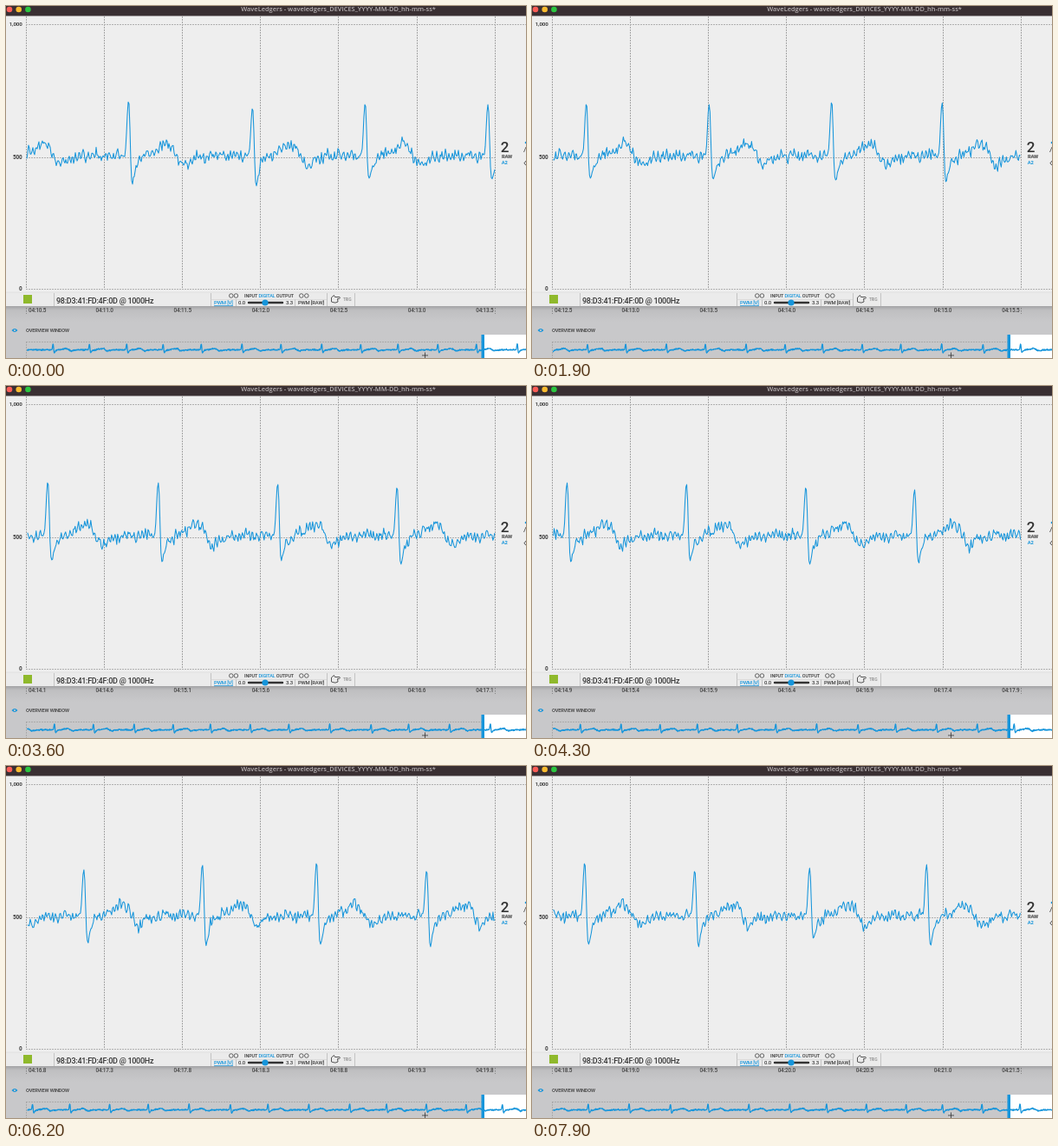
An HTML page with a canvas that plays this animation: 600x407 px, repeating every 8 s.

```html
<!DOCTYPE html>
<html lang="en">
<head>
<meta charset="utf-8">
<title>Signal recorder</title>
<style>
html, body { margin: 0; width: 100%; height: 100%; overflow: hidden; background: #c8c8ca; }
canvas { display: block; width: 600px; height: 407px; }
</style>
</head>
<body>
<canvas id="stage" width="600" height="407"></canvas>
<script>
const ctx = document.getElementById('stage').getContext('2d');
const BLUE = '#1695db', INK = '#3c3c3c', PANEL = '#c8c8ca', PAPER = '#eeeeee';
const LEFT = 23.5, STEP = 90.1, CHUNK = 27.05, LOOP = 8000;
const BASE = 173;
const NARROW = 'Roboto, "Liberation Sans", sans-serif';

// Beat position along the recording, peak height, trough depth
const beats = [
  [-1466, 114, 205], [-1340, 116, 203], [-1211, 113, 206], [-1085, 118, 204],
  [-953, 115, 205], [-812, 112, 203], [-677, 116, 206], [-536, 114, 204],
  [-401, 118, 206], [-272, 113, 205], [-134, 116, 203], [-0.5, 114, 205],
  [141, 111, 206], [284, 119, 208], [414, 114, 199], [555.7, 114, 201],
  [697, 112, 201], [824.5, 112, 205], [962.3, 114, 203], [1100, 118, 206],
  [1225.5, 120, 204], [1362.3, 115, 209], [1494, 113, 206], [1621, 122, 209],
  [1753.6, 118, 201], [1888.6, 114, 208]
];

// Slow wave that follows each spike
const tail = [[9, 11], [12, 6], [18, 1], [28, -4], [36, -9], [45, -14],
  [51, -10], [56, 3], [62, 12], [72, 5], [84, 1], [94, 0]];

function interp(points, x) {
  if (x <= points[0][0]) return points[0][1];
  for (let i = 1; i < points.length; i++) {
    const [x0, y0] = points[i - 1], [x1, y1] = points[i];
    if (x <= x1) return y0 + (y1 - y0) * (x - x0) / (x1 - x0);
  }
  return points[points.length - 1][1];
}

function rand(i) {
  const v = Math.sin(i * 127.1 + 11.7) * 43758.5453;
  return v - Math.floor(v);
}

function noise(i) {
  const ripple = Math.sin(i * 1.45 + 2 * Math.sin(i * 0.17)) * (1.5 + 4.5 * rand(i));
  const drift = 2 * Math.sin(i * 0.37 + 2 * Math.sin(i * 0.05));
  return ripple + drift + (rand(i + 5000) - 0.5) * 6;
}

function level(i) {
  const n = beats.findIndex(b => b[0] - 7 > i);
  const beat = beats[n < 0 ? beats.length - 1 : n - 1];
  if (!beat) return BASE + noise(i);
  const [pos, top, low] = beat, d = i - pos - 0.4;
  if (d > 9) return BASE + interp(tail, d) + noise(i);
  const up = top - BASE, down = low - BASE;
  const spike = [[-7, 0], [-4, -2], [-3, up * 0.2], [-1.3, up * 0.8], [-0.5, up],
    [0.5, up], [1.3, up * 0.7], [2.5, 4], [3.4, down * 0.85], [4.6, down],
    [6.3, down * 0.75], [9, 11]];
  return BASE + interp(spike, d) + noise(i) * (d < -4 || d > 5 ? 0.4 : 0);
}

const FIRST = -1700, samples = [];
for (let i = FIRST; i < 2100; i++) samples.push(level(i));
const sample = i => samples[i - FIRST];

function text(str, x, y, size, color = INK, align = 'left', weight = 500, family = NARROW) {
  ctx.font = `${weight} ${size}px ${family}`;
  ctx.letterSpacing = family === NARROW ? `${-0.03 * size}px` : '0px';
  ctx.fillStyle = color;
  ctx.textAlign = align;
  ctx.fillText(str, x, y);
}

function rect(x, y, w, h, color) {
  ctx.fillStyle = color;
  ctx.fillRect(x, y, w, h);
}

function line(x0, y0, x1, y1, color, width = 1, dash = []) {
  ctx.strokeStyle = color;
  ctx.lineWidth = width;
  ctx.setLineDash(dash);
  ctx.beginPath();
  ctx.moveTo(x0, y0);
  ctx.lineTo(x1, y1);
  ctx.stroke();
  ctx.setLineDash([]);
}

function disc(x, y, r, color, hollow) {
  ctx.beginPath();
  ctx.arc(x, y, r, 0, Math.PI * 2);
  ctx.lineWidth = 0.8;
  ctx[hollow ? 'strokeStyle' : 'fillStyle'] = color;
  hollow ? ctx.stroke() : ctx.fill();
}

function shape(d, color, width) {
  const p = new Path2D(d);
  ctx.strokeStyle = ctx.fillStyle = color;
  ctx.lineWidth = width || 1;
  width ? ctx.stroke(p) : ctx.fill(p);
}

function titleBar() {
  rect(0, 0, 600, 11.5, '#392f32');
  ['#fb5d57', '#fbbc30', '#2bc640'].forEach((c, i) => disc(4 + i * 10.7, 4, 3.3, c));
  text('WaveLedgers - waveledgers_DEVICES_YYYY-MM-DD_hh-mm-ss*', 383.5, 3.8, 7.45,
    '#b8b2b4', 'center', 600, '"Open Sans", sans-serif');
}

function plotArea() {
  rect(0, 11, 600, 320, PAPER);
  for (let i = 0; i < 7; i++) {
    const x = Math.floor(LEFT + i * STEP) + 0.5;
    line(x, 12, x, 328, '#a6a6a6', 1, [2, 1]);
  }
  [21.5, 175.5, 327.5].forEach(y => line(23, y, 600, y, '#b0b0b0', 1, [2, 1]));
  rect(565, 150, 35, 40, PAPER);
  text('1,000', 18.5, 21.5, 6.2, INK, 'right', 700);
  text('500', 18.5, 175, 6.4, INK, 'right', 700);
  text('0', 18.5, 327.5, 6.4, INK, 'right', 700);
  text('2', 575.3, 163.5, 17, '#333', 'center');
  text('RAW', 578, 174, 5.8, INK, 'center', 700);
  text('A2', 575.2, 181, 5.8, BLUE, 'center', 700);
  disc(600, 158, 1.3, BLUE);
  shape('M600 163 L597.5 169', '#555', 0.9);
  shape('M600 179 L597.8 182 L600 184', '#555', 1);
}

function toolbar() {
  rect(0, 331, 600, 16, '#ebebeb');
  line(0, 331, 600, 331, '#dedede', 0.8);
  rect(20, 334, 10, 10, '#8fb92c');
  [55.5, 236.5, 265.5, 333.5, 370.5, 402.5].forEach((x, i) =>
    line(x, i === 2 || i === 3 ? 339 : 332, x, 347, '#b9b9b9', 0.8));
  line(236, 339.5, 370, 339.5, '#cfcfcf', 0.6);
  text('98:D3:41:FD:4F:0D @ 1000Hz', 58, 341, 9, '#333');
  [259.8, 265.4, 340.8, 346.8].forEach(x => disc(x, 335, 2.3, '#444', true));
  text('INPUT', 275, 335, 5.5);
  text('DIGITAL', 301, 335, 5.5, BLUE, 'center');
  text('OUTPUT', 332, 335, 5.5, INK, 'right');
  text('PWM [V]', 240, 343.3, 6, BLUE);
  line(240, 346.6, 262, 346.6, BLUE, 0.8);
  text('0.0', 268, 343.3, 6);
  text('3.3', 331, 343.3, 6, INK, 'right');
  text('PWM [RAW]', 337, 343.3, 5.9);
  ctx.lineCap = 'round';
  line(280, 343, 319, 343, '#333', 2.4);
  ctx.lineCap = 'butt';
  disc(299, 343, 3.6, BLUE);
  shape('M375.5 337 L378.5 334.5 L379.5 336.5 L385 336.5 Q386 338 384.5 338.5 L382.5 338.5 L383 342 Q380 344 377 342.5 L375.5 342 Z', '#555', 1);
  text('TRIG', 389, 339.5, 4.6, '#777', 'left', 400);
}

function lowerPanel() {
  rect(0, 347, 600, 60, PANEL);
  const shade = ctx.createLinearGradient(0, 347, 0, 366);
  shade.addColorStop(0, 'rgba(90,90,90,.35)');
  shade.addColorStop(0.25, 'rgba(110,110,110,.1)');
  shade.addColorStop(1, 'rgba(130,130,130,0)');
  rect(0, 347, 600, 19, shade);
  line(23.5, 349, 23.5, 356, '#777', 0.8, [1.5, 1.5]);
  line(564.5, 349, 564.5, 356, '#777', 0.8, [1.5, 1.5]);
  shape('M6.5 375 Q10 371 13.5 375 Q10 379 6.5 375 Z', BLUE);
  disc(10, 375, 1.1, PANEL);
  text('OVERVIEW WINDOW', 23, 375.3, 5.7);
  line(23, 388.5, 549, 388.5, '#a2a2a2', 0.8, [2, 1]);
  line(23.5, 388, 23.5, 407, '#a2a2a2', 0.8, [2, 1]);
  rect(551, 380, 49, 27, '#fff');
  rect(548.5, 380, 3.5, 27, BLUE);
}

function timeLabels(k) {
  for (let i = 0; i < 7; i++) {
    const tenths = Math.round((1050 + 15 * k + 50 * i) / 10);
    const label = '04:' + (tenths / 10).toFixed(1);
    const x = i === 0 ? 26 : i === 6 ? 562.5 : LEFT + i * STEP;
    text(label, x, 352.3, 6.4, '#444', i === 0 ? 'left' : i === 6 ? 'right' : 'center');
  }
}

// Draws recorded samples from world position a to b
function trace(a, b, mapX, mapY, width) {
  ctx.beginPath();
  for (let i = Math.ceil(a); i <= b; i++) ctx.lineTo(mapX(i), mapY(sample(i)));
  ctx.strokeStyle = BLUE;
  ctx.lineWidth = width;
  ctx.lineJoin = 'round';
  ctx.stroke();
}

function draw(now) {
  const tick = Math.floor((now % LOOP) / 100);
  const k = Math.ceil(tick / 1.5), shift = k * CHUNK;
  ctx.textBaseline = 'middle';
  lowerPanel();
  plotArea();
  titleBar();
  toolbar();
  timeLabels(k);
  trace(24 + shift, 564 + shift, i => i - shift, y => y, 1.05);
  trace(shift - 1556, shift + 174, i => 550.5 + (i - shift - 23) / 3,
    y => 397.5 + (y - BASE) * 0.11, 1.3);
  line(480, 404, 487, 404, '#333', 0.8);
  line(483.5, 400.5, 483.5, 407, '#333', 0.8);
}

function loop() {
  draw(performance.now());
  requestAnimationFrame(loop);
}
loop();
</script>
</body>
</html>
```
